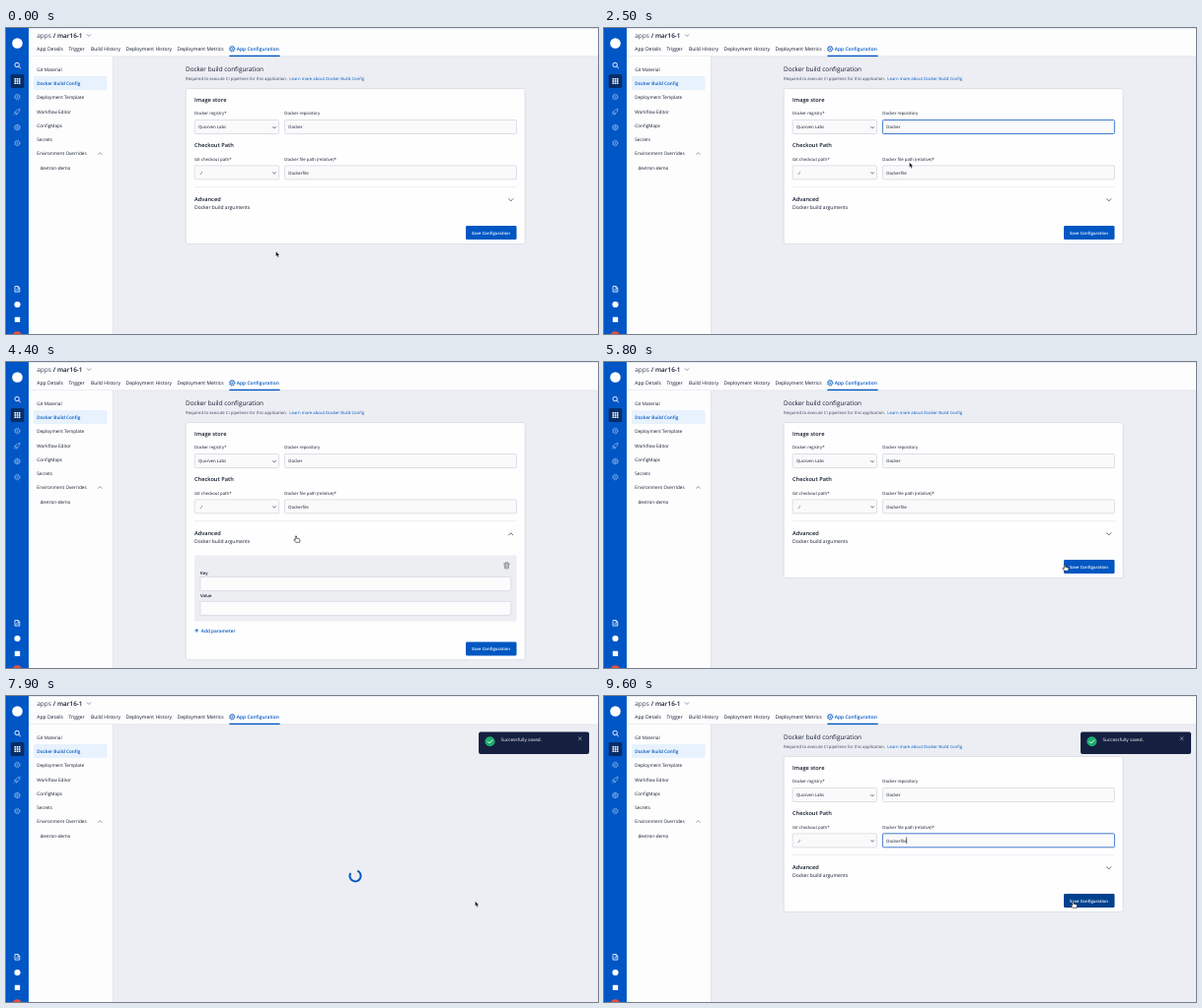
Write an HTML page that moves like this. It is 600 px wide and 311 px high and loops after 9700 ms.

```html
<!DOCTYPE html>
<html lang="en">
<head>
<meta charset="utf-8">
<title>Docker build configuration</title>
<style>
html, body { margin: 0; width: 100%; height: 100%; overflow: hidden; background: #fff; }
svg { display: block; width: 600px; height: 311px; }
text { font-family: "Open Sans", sans-serif; text-rendering: geometricPrecision; white-space: pre; }
</style>
</head>
<body>
<svg id="stage" viewBox="0 0 600 311" xmlns="http://www.w3.org/2000/svg"></svg>
<script>
const LOOP = 9700, STEP = 100;
const INK = '#10192d', BLUE = '#0057c2', DARK = '#00418d', PALE = '#86b0e6';
const stage = document.getElementById('stage');

const text = (x, y, size, str, fill = INK, weight = 400) =>
  `<text x="${x}" y="${y}" font-size="${size}" fill="${fill}" font-weight="${weight}">${str}</text>`;
const rect = (x, y, w, h, fill, extra = '') =>
  `<rect x="${x}" y="${y}" width="${w}" height="${h}" fill="${fill}" ${extra}/>`;
const line = (d, stroke, w, extra = '') =>
  `<path d="${d}" fill="none" stroke="${stroke}" stroke-width="${w}" stroke-linecap="round" stroke-linejoin="round" ${extra}/>`;
const circle = (x, y, r, fill, extra = '') => `<circle cx="${x}" cy="${y}" r="${r}" fill="${fill}" ${extra}/>`;
const group = (id, body) => `<g id="${id}">${body}</g>`;
const chevron = (x, y, w, h, color, sw) => line(`M${x - w} ${y - h / 2}l${w} ${h}l${w} ${-h}`, color, sw);
const field = (x, y, w, fill = '#fafafb', id = '') =>
  rect(x, y, w, 14, fill, `id="${id}" rx="1" stroke="#cfd4db" stroke-width=".7"`);
const arc = (r, color, sw) => {
  const a = .72, c = r * Math.cos(a), s = r * Math.sin(a);
  return `<path d="M${c} ${s}A${r} ${r} 0 1 1 ${c} ${-s}" fill="none" stroke="${color}" stroke-width="${sw}"/>`;
};
const gear = (x, y, color) =>
  circle(x, y, 2.2, 'none', `stroke="${color}" stroke-width=".8"`) + circle(x, y, .8, color) +
  circle(x, y, 2.9, 'none', `stroke="${color}" stroke-width=".7" stroke-dasharray="1.14 1.14"`);

function sidebar() {
  let s = rect(0, 0, 23, 311, '#0056c5') + circle(11.5, 15.5, 5.3, '#fff');
  s += circle(11.2, 37.5, 2.2, 'none', 'stroke="#fff" stroke-width=".9"') + line('M12.9 39.2l1.7 1.7', '#fff', .9);
  s += rect(4.7, 47, 13.6, 14, '#062d68', 'rx="1.5"');
  for (let i = 0; i < 9; i++)
    s += rect(8.5 + i % 3 * 2.2, 51 + Math.floor(i / 3) * 2.2, 1.6, 1.6, '#fff');
  s += gear(11.4, 70, PALE) + gear(11.4, 117, PALE);
  s += line('M9.6 85.2q1.3-2.8 4.5-2.9q0 3.1-2.8 4.7zM9.6 85.2l-1.2.5l1 .8M11.3 87l-.3 1.3l-1-.8M9 87.3l-.7.8', PALE, .8);
  s += circle(11.4, 101, 2.7, 'none', `stroke="${PALE}" stroke-width=".8"`) +
    line('M8.7 100.2h5.4M8.9 102h5M11.4 98.3v5.4', PALE, .6);
  s += line('M9.4 262.5h2.8l1.6 1.6v4h-4.4zM12 262.6v1.7h1.6M10.7 266h1.8', '#fff', .8);
  s += circle(11.5, 281, 3.1, '#fff') + rect(8.8, 293.8, 5.4, 5.2, '#fff', 'rx=".6"');
  return s + circle(11.3, 313.2, 5, '#e8503a');
}

function header() {
  let s = rect(23, 0, 577, 29, '#fdfdfe') + rect(0, 0, 600, .7, '#dde3ee');
  s += text(31.2, 9.6, 6.5, 'apps', '#39455c') + text(47.8, 9.6, 6.4, '/ mar16-1', INK, 600);
  s += chevron(84, 7.6, 1.8, 1.8, '#68737f', .7);
  const tabs = [[31.3, 'App Details'], [63.5, 'Trigger'], [86, 'Build History'],
    [121.5, 'Deployment History'], [173.5, 'Deployment Metrics']];
  for (const [x, label] of tabs) s += text(x, 22.9, 5.03, label);
  s += gear(229.2, 21.2, BLUE) + text(233.8, 22.9, 4.9, 'App Configuration', BLUE, 600);
  return s + rect(23, 28.6, 577, .6, '#d5dae2') + rect(226.4, 27.7, 51.2, 1.4, BLUE);
}

function nav() {
  let s = rect(23, 29, 85.3, 282, '#fdfdfe') + rect(108, 29, .6, 282, '#d5dae2');
  s += rect(28, 49, 74.5, 14, '#e7f2fd', 'rx="1"');
  const items = ['Git Material', 'Docker Build Config', 'Deployment Template', 'Workflow Editor',
    'ConfigMaps', 'Secrets', 'Environment Overrides', 'devtron-demo'];
  items.forEach((label, i) => {
    const on = i === 1;
    s += text(i === 7 ? 34.4 : 31.3, 43.7 + i * 14.27, 4.68, label, on ? BLUE : INK, on ? 600 : 400);
  });
  return s + line('M93.6 128.3l1.8-1.6l1.8 1.6', '#68737f', .7);
}

function form() {
  let s = text(182, 44.3, 6.4, 'Docker build configuration', INK, 500);
  s += text(182, 53, 4.28, 'Required to execute CI pipelines for this application.', '#3b4760');
  s += text(287.3, 53, 4.25, 'Learn more about Docker Build Config', BLUE, 500);
  s += rect(182.3, 61.5, 343.7, 158, '#fefefe', 'id="card" rx="2" stroke="#d3d8e1" stroke-width=".7"');
  s += text(191, 74.9, 5.68, 'Image store', INK, 600) + text(191, 121.4, 5.68, 'Checkout Path', INK, 600);
  s += text(191, 88.2, 4.3, 'Docker registry*') + text(282.3, 88.2, 4.32, 'Docker repository');
  s += text(191, 134.6, 4.3, 'Git checkout path*') + text(282.3, 134.6, 4.32, 'Docker file path (relative)*');
  s += field(191.2, 93.5, 85.3) + field(282.4, 93.5, 235, undefined, 'repo');
  s += field(191.2, 139.8, 85.3) + field(282.4, 139.8, 235, undefined, 'path');
  s += text(195, 102.1, 4.33, 'Quorven Labs') + text(286.3, 102.1, 4.33, 'Docker');
  s += text(196, 148.5, 4.33, './') + text(286.3, 148.5, 4.33, 'Dockerfile');
  s += chevron(272, 101.2, 1.5, 1.4, '#3b4452', .7) + chevron(272, 147.5, 1.5, 1.4, '#3b4452', .7);
  s += rect(301.1, 97.3, .6, 6.6, '#111', 'id="caretRepo"') + rect(306.5, 143.3, .6, 6.8, '#111', 'id="caretPath"');
  s += rect(191, 161.2, 326.5, .6, '#e3e6eb');
  s += text(191, 175.5, 5.65, 'Advanced', INK, 600) + text(191, 184.3, 5.02, 'Docker build arguments');
  s += group('arrow', chevron(0, 0, 2.1, 2.2, '#3b4452', .8));
  let p = rect(191, 196.5, 326.5, 67, '#edeef2', 'rx="1"');
  p += line('M504.6 205h5.6M506.4 204.8v-1.1h2v1.1M505.2 205.2l.3 4.6h3.8l.3-4.6M506.7 206.4v2.2M508.1 206.4v2.2', '#555f6e', .6);
  p += text(197, 215.8, 4.3, 'Key', INK, 600) + field(196.9, 218.4, 314.8, '#fcfcfd');
  p += text(197, 239.3, 4.3, 'Value', INK, 600) + field(196.9, 243.3, 314.8, '#fcfcfd');
  p += line('M191.7 272.9h3M193.2 271.4v3', BLUE, .8) + text(197.8, 274.6, 4.75, 'Add parameter', BLUE, 600);
  s += group('params', p);
  return s + group('save', rect(466, 201.1, 51.5, 13.9, BLUE, 'id="button" rx="1.3"') +
    group('label', text(472, 209.8, 4.28, 'Save Configuration', '#fff', 600)) +
    group('wait', arc(2.3, '#fff', .9)));
}

const toast = rect(483, 36.5, 112, 22.5, '#151f40', 'rx="2"') + circle(494.4, 46.3, 5, '#1dad70') +
  line('M492.2 46.4l1.6 1.6l2.9-3.1', '#fff', .9) + text(505.5, 45.7, 4.7, 'Successfully saved.', '#fff') +
  line('M584.1 41.8l3 3M587.1 41.8l-3 3', '#c9cfdd', .6);

const hand = `<path d="M-.7 .6q.7-.8 1.3 0V2.7l2.7.7q.8.3.7 1.2l-.5 2.2H-.3L-2.2 4.5q-.1-.9.8-.6l.7.5z" fill="#fff" stroke="#111" stroke-width=".6" stroke-linejoin="round"/>`;
const pointer = `<path d="M0 0V5.3L1.2 4.2L2.1 6.2L3 5.8L2.2 3.9H3.8Z" fill="#000" stroke="#fff" stroke-width=".4" stroke-linejoin="round"/>`;
const beam = line('M-1-3q1 0 1 .7q0-.7 1-.7M0-2.3V2.3M-1 3q1 0 1-.7q0 .7 1 .7', '#222', .6);

stage.innerHTML = rect(0, 0, 600, 311, '#eceef3') + header() + nav() + sidebar() +
  group('form', form()) + group('loader', arc(5.6, BLUE, 2)) + group('toast', toast) +
  group('cursor', group('hand', hand) + group('pointer', pointer) + group('beam', beam));

const el = {};
stage.querySelectorAll('[id]').forEach(n => { if (n.id) el[n.id] = n; });
const show = (id, on) => el[id].setAttribute('display', on ? 'inline' : 'none');
const set = (id, attrs) => { for (const k in attrs) el[id].setAttribute(k, attrs[k]); };
const clamp = v => Math.max(0, Math.min(1, v));
const smooth = v => v * v * (3 - 2 * v);
const easeOut = v => 1 - (1 - v) ** 3;
const within = (t, a, b) => t >= a && t < b;

// Interpolates rows of [key, ...values]
function track(rows, at, ease) {
  let i = 0;
  while (i < rows.length - 2 && at >= rows[i + 1][0]) i++;
  const [a, b] = [rows[i], rows[i + 1]], k = ease(clamp((at - a[0]) / (b[0] - a[0])));
  return a.slice(1).map((v, j) => v + (b[j + 1] - v) * k);
}

const path = [[0, 273.5, 227], [1000, 318, 101], [1300, 318, 101], [2000, 311, 101], [2150, 311, 101],
  [2500, 309.5, 136.5], [2900, 308, 147], [3250, 308, 147], [3700, 294, 176.5], [5100, 294, 176.5],
  [5800, 467, 205.5], [6150, 468, 206], [7100, 475.5, 208.5], [LOOP, 475.5, 208.5]];
const bounce = [[0, 1085], [.6, -9], [.75, 3.6], [.9, -1.8], [1, 0]];

function focusField(id, caret, t, from, to) {
  const on = within(t, from, to);
  set(id, { stroke: on ? '#2f6fca' : '#cfd4db', 'stroke-width': on ? .9 : .7 });
  show(caret, on && Math.floor((t - from) / 500) % 2 === 0);
}

function draw(t) {
  const open = within(t, 3900, 4700), saving = within(t, 7200, 7600), loading = within(t, 7600, 8600);
  show('form', !loading);
  show('loader', loading);
  set('loader', { transform: `translate(354 182.8) rotate(${(t - 8200) * .36})` });

  focusField('repo', 'caretRepo', t, 1900, 2800);
  if (t < 8600) focusField('path', 'caretPath', t, 2900, 3700);
  else focusField('path', 'caretPath', t, 8600, LOOP + 1);

  set('card', { height: open ? 241.2 : 158 });
  show('params', open);
  const turn = 180 * (clamp((t - 3800) / 200) - clamp((t - 4600) / 200));
  set('arrow', { transform: `translate(511.7 174.8) rotate(${turn})` });
  set('save', { transform: `translate(0 ${open ? 83.4 : 0})` });
  set('button', { x: saving ? 482 : 466, width: saving ? 35.5 : 51.5, fill: t >= 6000 ? DARK : BLUE });
  show('label', !saving);
  show('wait', saving);
  set('wait', { transform: `translate(499.6 208) rotate(${20 + (t - 7500) * .36})` });

  const k = (t - 7525) / 750;
  show('toast', k >= 0);
  set('toast', { transform: `translate(${track(bounce, clamp(k), easeOut)[0]} 0)`, opacity: easeOut(clamp(k / .6)) });

  const [x, y] = track(path, t, smooth);
  const typing = x > 282 && x < 518 && (within(y, 93, 108) || within(y, 139.5, 154));
  const row = within(x, 191, 518) && within(y, 168, 188);
  const press = x >= 466 && y > 201 && !saving && !loading;
  const kind = typing ? 'beam' : row || press ? 'hand' : 'pointer';
  for (const c of ['beam', 'hand', 'pointer']) show(c, c === kind);
  set('cursor', { transform: `translate(${x} ${y})` });
}

function tick() {
  const t = performance.now() % LOOP;
  draw(Math.floor(t / STEP) * STEP);
  requestAnimationFrame(tick);
}
tick();
</script>
</body>
</html>
```
